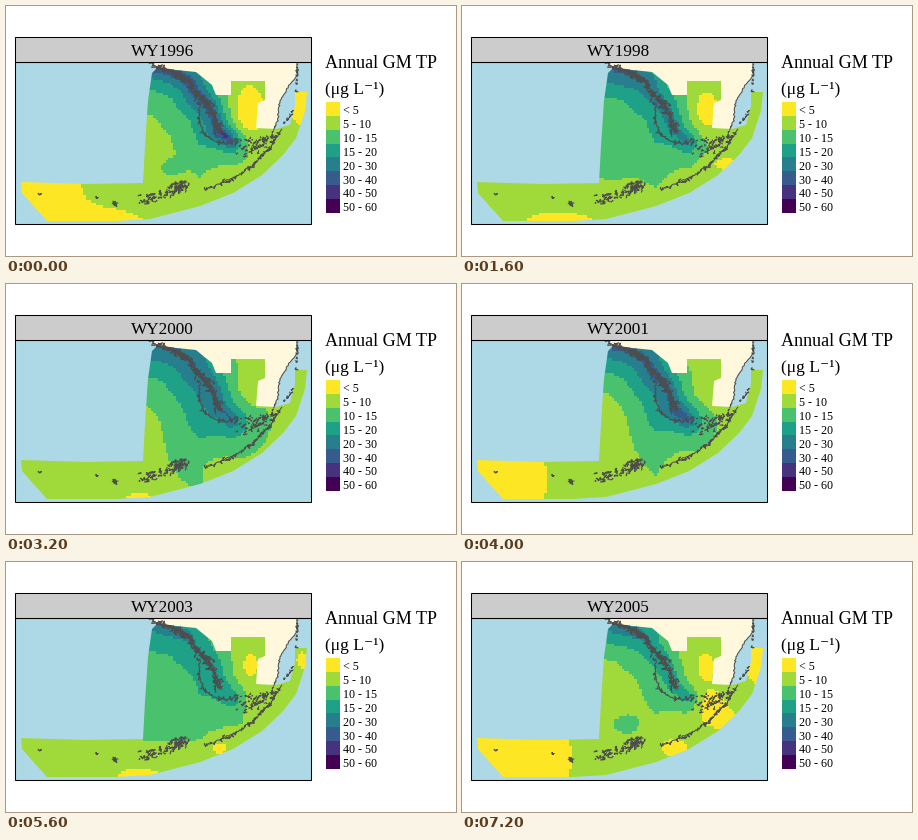
A matplotlib script for the animation above (8 s loop, 450 by 250 pixels).

```python
import numpy as np
import matplotlib.pyplot as plt
from matplotlib.animation import FuncAnimation
from matplotlib.collections import LineCollection
from matplotlib.colors import ListedColormap
from matplotlib.patches import Polygon, Rectangle
from matplotlib.path import Path

W, H, DPI = 450, 250, 100
COLORS = ["#FDE725", "#9FDA3A", "#4AC16D", "#1FA187",
          "#277F8E", "#365C8D", "#46327E", "#440154"]
LABELS = ["< 5", "5 - 10", "10 - 15", "15 - 20",
          "20 - 30", "30 - 40", "40 - 50", "50 - 60"]
SEA, LAND, COAST = "#ADD8E6", "#FFF8DC", "#4D4D4D"
SERIF = ["Liberation Serif", "DejaVu Serif"]

# Key points of the coast, from north-west to south-east
GULF = [(145, 57), (152, 62), (166, 65), (184, 76), (190, 87), (204, 102), (213, 124)]
CAPE = [(194, 97), (193, 112), (198, 128), (208, 135), (222, 138), (233, 133)]
BAY = [(291, 57), (291, 70), (283, 80), (274, 95), (271, 117), (267, 125)]
KEYS = [(199, 184), (228, 172), (246, 160), (263, 143), (276, 123)]

# Outer edge of the mapped area, then the rest of its outline
RIM = [(301, 86), (299, 105), (290, 132), (277, 149), (256, 169),
       (227, 187), (194, 200), (144, 213), (110, 215), (41, 215)]
REGION = RIM + [(16, 187), (15, 176), (80, 178), (137, 177), (139, 140),
                (142, 95), (146, 67), (151, 62), (190, 66), (206, 79),
                (210, 89), (225, 89), (225, 75), (259, 75), (259, 94),
                (252, 97), (250, 122), (270, 123), (284, 119), (289, 100),
                (289, 86)]

# Zones that rise or fall from year to year: centre and radii
ZONES = dict(west=(35, 195, 60, 55), bottom=(100, 216, 48, 13),
             bank=(135, 214, 30, 11), reef=(212, 186, 16, 10),
             keys=(262, 158, 22, 10), bay=(250, 144, 14, 14),
             east=(296, 99, 15, 24), inland=(243, 108, 15, 27),
             shelf=(141, 140, 30, 42), north=(158, 70, 28, 20),
             cape=(214, 130, 13, 11), spot=(163, 163, 15, 11))

# Strength and reach of the coastal plume, and the change in each zone
SEASONS = {
    1996: dict(coast=4.4, reach=22, cape=0.8, west=-0.85, bottom=-0.9,
               east=-1, inland=-1.7, spot=0.4),
    1997: dict(coast=4, reach=26, bottom=-1.1, east=-0.7, inland=-1.1),
    1998: dict(coast=3.2, reach=30, north=0.7, shelf=0.6, bottom=-0.9,
               keys=-0.9, inland=-1.3),
    1999: dict(coast=3.6, reach=30, west=-1, bank=-0.8, east=-1, inland=-1),
    2000: dict(coast=3.7, reach=40, shelf=-0.4, bank=-0.8, reef=-0.6, inland=-0.75),
    2001: dict(coast=4, reach=31, cape=0.6, shelf=-0.6, west=-1.1, inland=-0.56),
    2002: dict(coast=3.4, reach=32, shelf=0.3, bottom=-0.8, east=-1, inland=-0.9),
    2003: dict(coast=2.6, reach=36, north=0.5, shelf=0.7, bank=-1, reef=-0.9,
               bay=-0.7, east=-0.6, inland=-1.1),
    2004: dict(coast=1.9, reach=26, north=0.9, shelf=0.2, rim=-5,
               bottom=-1, reef=-1, bay=-0.7, inland=-1.5),
    2005: dict(coast=2.6, reach=20, north=0.9, spot=0.8, west=-2.4,
               reef=-1.1, keys=-0.9, bay=-1.4, east=-1.2, inland=-0.8),
}
YEARS = list(SEASONS)


def along(pts, t):
    """Points at fractions t of a polyline's length."""
    p = np.array(pts, float)
    d = np.r_[0, np.cumsum(np.hypot(*np.diff(p, axis=0).T))]
    return np.column_stack([np.interp(t * d[-1], d, p[:, k]) for k in (0, 1)])


X, Y = np.meshgrid(np.arange(10, 305, 2.5) + 1.25, np.arange(57, 217, 2.5) + 1.25)


def distance(pts):
    """Distance of every cell from a polyline."""
    px, py = along(pts, np.linspace(0, 1, 120)).T
    return np.hypot(X[..., None] - px, Y[..., None] - py).min(axis=-1)


# The plume fades faster towards the east
from_coast = distance(GULF + [(226, 136)]) * (1 + np.clip((X - 195) / 25, 0, 1))
SHAPES = {name: np.exp(-((X - x) / rx) ** 2 - ((Y - y) / ry) ** 2)
          for name, (x, y, rx, ry) in ZONES.items()}
SHAPES["rim"] = np.exp(-(distance(RIM) / 12) ** 2)


def levels(coast, reach, **zones):
    """Concentration class of every cell."""
    field = 1.5 + coast * np.exp(-from_coast / reach)
    for name, change in zones.items():
        field = field + change * SHAPES[name]
    return np.clip(np.floor(field), 0, len(COLORS) - 1)


rasters = [levels(**season) for season in SEASONS.values()]
rng = np.random.default_rng(7)


def ragged(pts, n, wobble):
    return along(pts, np.linspace(0, 1, n)) + rng.normal(0, wobble, (n, 2))


def islets(pts, n, spread, size):
    """Small island outlines strewn along a line."""
    centres = along(pts, rng.random(n)) + rng.normal(0, spread, (n, 2))
    return [c + rng.normal(0, size, (4, 2)) for c in centres]


fig = plt.figure(figsize=(W / DPI, H / DPI), dpi=DPI, facecolor="white")
ax = fig.add_axes([0, 0, 1, 1])
ax.axis("off")

ax.add_patch(Rectangle((9, 56), 296, 162, fc=SEA, ec="none"))
ax.add_patch(Polygon(GULF + [(222, 130), (250, 130)] + BAY[::-1],
                     fc=LAND, ec="none", zorder=1))
image = ax.imshow(rasters[0], cmap=ListedColormap(COLORS), vmin=-0.5, vmax=7.5,
                  extent=(10, 305, 217, 57), interpolation="nearest",
                  aspect="auto", zorder=2)
image.set_clip_path(Path(REGION + REGION[:1]), ax.transData)
ax.set(xlim=(0, W), ylim=(H, 0))

lines = [ragged(GULF, 80, 1.2), ragged(GULF, 60, 2), ragged(CAPE, 60, 0.6),
         ragged(BAY, 50, 0.5), ragged(KEYS, 80, 0.6)]
lines += islets(GULF[1:5], 45, 1.6, 1.2)
lines += islets(GULF[4:], 45, 2.8, 1.3)
lines += islets(CAPE, 15, 1.5, 0.9)
lines += islets([(230, 136), (262, 134)], 40, 4, 0.7)
lines += islets([(240, 148), (268, 129)], 40, 3, 0.8)
lines += islets(KEYS, 40, 0.8, 1)
lines += islets([(135, 195), (158, 188), (183, 179)], 75, 2.6, 1)
lines += islets([(164, 180), (184, 176)], 20, 2, 0.8)
lines += islets([(105, 197), (114, 199)], 8, 1, 1)
lines += islets([(291, 58), (290, 100), (279, 118)], 22, 0.6, 0.7)
lines += islets([(31, 188), (36, 188)], 3, 0.4, 0.5)
lines += islets([(88, 192), (92, 192)], 3, 0.4, 0.5)
coast = LineCollection(lines, colors=COAST, linewidths=0.75, zorder=3)
ax.add_collection(coast)
coast.set_clip_path(Rectangle((10, 57), 295, 161, transform=ax.transData))

ax.add_patch(Rectangle((9, 31), 296, 25, fc="#CCCCCC", ec="none", zorder=4))
for y, h in ((31, 25), (56, 162)):
    ax.add_patch(Rectangle((9, y), 296, h, fill=False, ec="black", lw=0.75, zorder=5))


def label(x, y, text, px, ha="left"):
    return ax.text(x, y, text, size=px * 72 / DPI, family=SERIF, ha=ha,
                   va="baseline", color="black", zorder=6)


title = label(156.5, 50, "", 17.3, "center")
label(319, 62, "Annual GM TP", 18.1)
label(319, 88, "(\u03bcg L\u207b\u00b9)", 17.5)
for i, (color, text) in enumerate(zip(COLORS, LABELS)):
    top = 95.8 + i * 13.9
    ax.add_patch(Rectangle((320, top), 14, 13.9, fc=color, ec="none", antialiased=False))
    label(337, top + 12.2, text, 12)


def update(i):
    image.set_data(rasters[i])
    title.set_text(f"WY{YEARS[i]}")
    return image, title


anim = FuncAnimation(fig, update, frames=len(YEARS), interval=800,
                     repeat=True, repeat_delay=0, blit=False)
plt.show()
```
